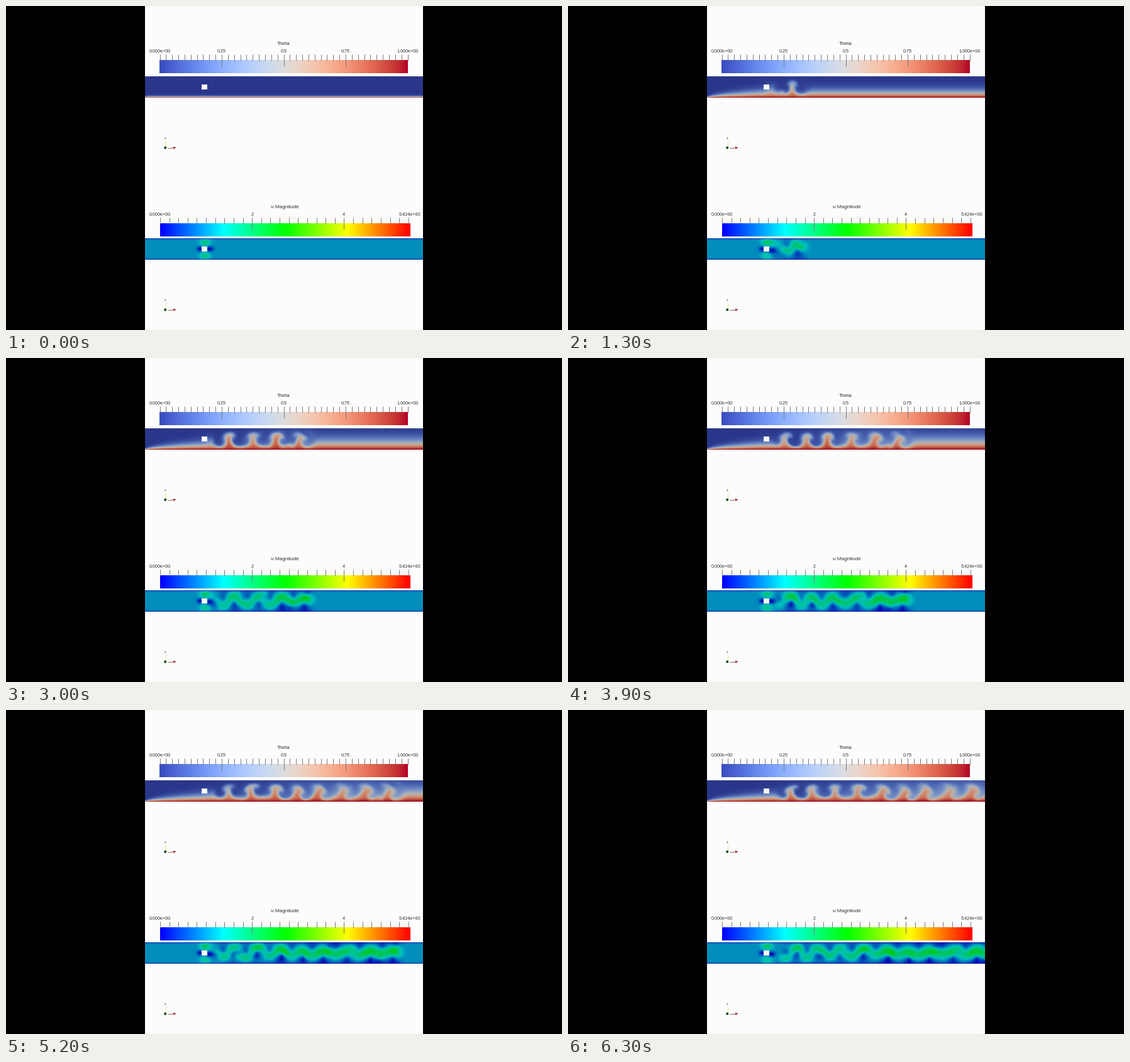
These frames come from a looping animation (884 px wide and 516 px high, 6400 ms). A matplotlib script:

```python
import numpy as np
import matplotlib.pyplot as plt
from matplotlib.animation import FuncAnimation
from matplotlib.colors import LinearSegmentedColormap, ListedColormap
from matplotlib.patches import Circle, Polygon, Rectangle

W, H, DPI = 884, 516, 100
FRAMES, INTERVAL = 64, 100
PT = 72 / DPI                      # points per pixel
LEFT, RIGHT, DEPTH = 221, 663, 34  # channel extent in pixels
THETA_TOP, SPEED_TOP = 112, 370
BLOCK_X, BLOCK_D = 315.5, DEPTH / 2
DRIFT = 64                         # wake convection, px per second
FIRST, SPACING, PLUMES = 271, 35.5, 10
U_MAX = 5.424
TEXT, TICK = "#303030", "#7c7c7c"


def dimmed(colors, low, high):
    """The colour map as it looks on a shaded surface."""
    s = np.linspace(0, 1, 256)
    rgb = colors(s)[:, :3] * (low + (high - low) * s)[:, None]
    return ListedColormap(rgb)


theta_bar = plt.get_cmap("coolwarm")
speed_bar = LinearSegmentedColormap.from_list(
    "rainbow", ["blue", "cyan", "lime", "yellow", "red"])
theta_map = dimmed(theta_bar, 0.72, 0.88)
speed_map = dimmed(speed_bar, 0.7, 0.9)

# Sample points: x along the channel, d above the hot lower wall
gx, gd = np.meshgrid(np.arange(LEFT + 1, RIGHT, 2.0),
                     DEPTH - 0.5 - np.arange(DEPTH))


def smooth(a, b, x):
    s = np.clip((x - a) / (b - a), 0, 1)
    return s * s * (3 - 2 * s)


def shed():
    """Each plume: a counter-rotating pair and one weak stray eddy."""
    rng = np.random.default_rng(4)
    eddies = []
    for i in range(PLUMES):
        x = FIRST - SPACING * i + rng.uniform(-3, 3)
        for side in (-1, 1):
            power = (0.9 + 0.2 * side) * rng.uniform(0.75, 1.1)
            eddies.append((x + 8.5 * side, BLOCK_D + rng.uniform(-2, 2),
                           side, power, rng.uniform(5.5, 7.5)))
        eddies.append((x + rng.uniform(10, 25), rng.uniform(8, 26),
                       rng.choice([-1, 1]), 0.5, 4.5))
    return eddies


EDDIES = shed()


def vortices(t):
    """Eddies in the channel now; they settle across the centre line."""
    out = []
    for start, depth, side, power, core in EDDIES:
        x = start + DRIFT * t
        gain = power * smooth(318, 350, x)
        if gain > 0 and x < RIGHT + 30:
            depth = depth + side * (2 - 6 * smooth(350, 560, x))
            out.append((x, depth, side * gain, core))
    return out


def swirl(x, d, street):
    u, v = np.zeros_like(x), np.zeros_like(x)
    for cx, cd, spin, core in street:
        dx, dd = (x - cx) / core, (d - cd) / core
        k = spin * np.exp(0.5 - 0.5 * (dx * dx + dd * dd))
        u += k * dd
        v -= k * dx
    return u, v


def wake_mask(x, t):
    front = 300 + DRIFT * t
    return smooth(325, 355, x) * (1 - smooth(front - 15, front + 8, x))


def theta_field(t, street):
    x, d = gx.copy(), gd.copy()
    if street:
        for _ in range(6):         # trace back to where the fluid came from
            u, v = swirl(x, d, street)
            lid = np.clip(d * (DEPTH - d) / 150, 0, 1)
            x -= 1.8 * u
            d = np.clip(d - 2.0 * v * lid, 0.3, DEPTH)
    inlet = 0.9 * np.sqrt(np.maximum(x - LEFT, 0) + 1)
    layer = np.minimum(inlet, 1.9 + 6.5 * np.sqrt(t))
    theta = np.exp(-(d / layer) ** 1.4)
    mixed = 0.1 + 0.55 * (1 - gd / DEPTH)
    share = 0.4 * wake_mask(gx, t) * smooth(320, 560, gx)
    return theta + share * (mixed - theta) * smooth(0, 8, gd)


def blob(dx, dd, wx, wd):
    return np.exp(-(dx / wx) ** 2 - (dd / wd) ** 2)


def speed_field(t, street):
    u, v = swirl(gx, gd, street)
    dx, dd = gx - BLOCK_X, gd - BLOCK_D
    bulge = 0.4 - 0.8 * (dd / BLOCK_D) ** 2
    u = 1.02 + 0.85 * u + bulge * wake_mask(gx, t)
    v = 0.75 * v
    sway = min(t, 1) * np.sin(2 * np.pi * DRIFT * t / SPACING)
    u += 0.85 * (1 + 0.3 * sway * np.sign(dd)) * blob(dx - 1, abs(dd) - 11, 8, 6)
    u -= 0.95 * blob(dx + 7, dd, 4.5, 4)
    u -= 1.0 * blob(dx - 8, dd + 2.5 * sway, 6, 4)
    wall = np.minimum(gd, DEPTH - gd)
    return np.hypot(u, v) * np.tanh(wall / 1.3)


fig = plt.figure(figsize=(W / DPI, H / DPI), dpi=DPI, facecolor="black")
ax = fig.add_axes([0, 0, 1, 1])
ax.set_axis_off()


def box(x, y, w, h, color, z=1):
    ax.add_patch(Rectangle((x, y), w, h, fc=color, lw=0, zorder=z))


def line(xs, ys, color, width=1):
    ax.plot(xs, ys, color=color, lw=width * PT, zorder=4,
            solid_capstyle="butt")


def label(x, y, s, px):
    ax.text(x, y, s, fontsize=px * PT, color=TEXT, family="Liberation Sans",
            ha="center", va="center", zorder=5)


def image(data, x0, x1, y0, y1, colors, top):
    return ax.imshow(data, extent=(x0, x1, y1, y0), cmap=colors, vmin=0,
                     vmax=top, interpolation="bilinear", aspect="auto",
                     zorder=2)


def legend(title, x0, x1, y, colors, top, step, major):
    """Colour bar with its title, ticks and numbers; y is the bar's top."""
    image(np.linspace(0, 1, 400)[None, :], x0, x1, y, y + 21, colors, 1)
    label((x0 + x1) / 2, y - 25.3, title, 8.2)

    def place(value):
        return x0 + 0.5 + (x1 - x0 - 1) * value / top

    for value in np.arange(0, top + step / 100, step):
        line([place(value)] * 2, [y - 9, y + 1], TICK)
    for value in np.arange(major, top, major):
        line([place(value)] * 2, [y - 9, y + 10], TICK)
        label(place(value), y - 13.5, f"{value:g}", 7.3)
    for value in (0, top):
        label(place(value), y - 13.5, f"{value:.3e}", 7.3)


def triad(y):
    line([253.5, 253.5], [y, y - 13], "#e6e6a0")
    label(253.5, y - 15.5, "z", 5)
    line([257, 267], [y, y], "#8a7070")
    ax.add_patch(Polygon([(266, y - 1.8), (271, y), (266, y + 1.8)],
                         fc="#a02020", lw=0, zorder=4))
    ax.add_patch(Circle((253.2, y), 2, fc="#0a4a0a", lw=0, zorder=5))


box(LEFT, 0, RIGHT - LEFT, H, "#fcfcfc")
legend("Theta", 244, 639, 86, theta_bar, 1, 0.025, 0.25)
legend("u Magnitude", 244.5, 642, 346, speed_bar, U_MAX, 0.2, 2)
triad(225.7)
triad(483.7)

theta_img = image(theta_field(0, []), LEFT, RIGHT, THETA_TOP,
                  THETA_TOP + DEPTH, theta_map, 1)
speed_img = image(speed_field(0, []), LEFT, RIGHT, SPEED_TOP,
                  SPEED_TOP + DEPTH, speed_map, U_MAX)
for top in (THETA_TOP, SPEED_TOP):
    box(311, top + 13, 9, 8, "#fcfcfc", z=3)

ax.set_xlim(0, W)
ax.set_ylim(H, 0)


def draw(frame):
    t = frame * INTERVAL / 1000
    street = vortices(t)
    theta_img.set_data(theta_field(t, street))
    speed_img.set_data(speed_field(t, street))
    return theta_img, speed_img


anim = FuncAnimation(fig, draw, frames=FRAMES, interval=INTERVAL,
                     repeat=True, repeat_delay=0, blit=False)
plt.show()
```
